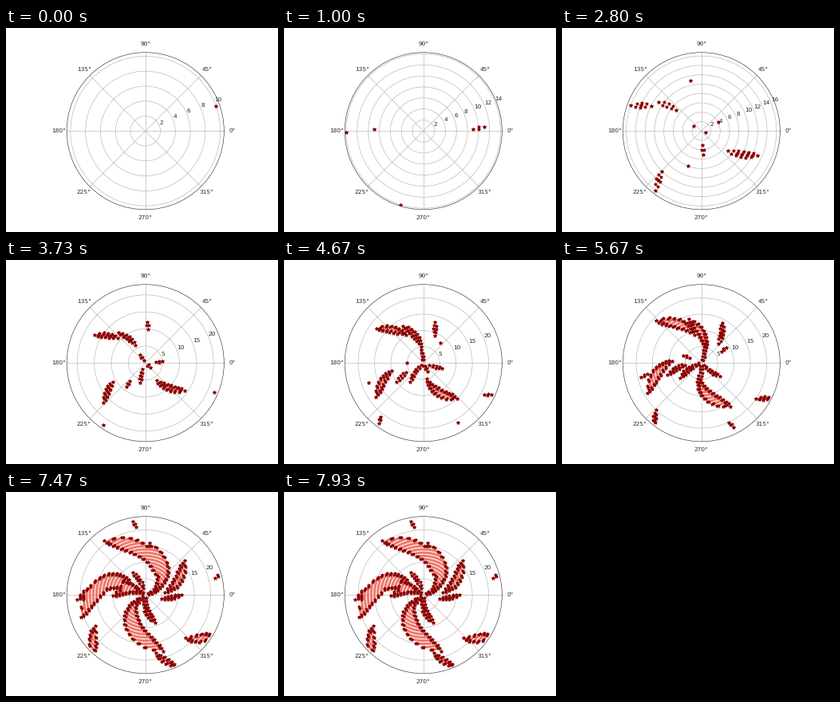
A matplotlib script that plays this animation: 341x256 px, repeating every 8 s.

```python
import matplotlib.pyplot as plt
import numpy as np
from matplotlib.animation import FuncAnimation

DPI = 64
K = 5 / 6                     # point scale of the small stage
STEP_MS = 2800 / 3            # time per galaxy step
STEPS = 9
DT, FRAMES = 40, 200
RINGS = 23
CELL = np.degrees(1)          # arc of one cell, divided by its ring
INK = "#2b2b2b"

plt.rcParams.update({
    "font.family": "DejaVu Sans", "font.size": 10 * K, "text.hinting": "none",
    "axes.linewidth": 0.8 * K, "grid.linewidth": 0.8 * K, "axes.edgecolor": INK,
    "xtick.color": INK, "ytick.color": INK,
    "xtick.major.size": 3.5 * K, "ytick.major.size": 3.5 * K,
    "xtick.major.pad": 10.5 * K - 7,   # polar labels add a fixed 7 pt
    "ytick.major.pad": 3.5 * K,
})

# (ring, degrees) of the sparks that start a cluster, step by step
SPARKS = [
    [(10, 19.6)],
    [(14, 181), (14, -107), (9, 178)],
    [(4, -63)],
    [(11, 102), (8, -111), (2, 148), (4, 28), (1, -16)],
    [(22, -124), (22, -23)],
    [(5, 179), (8, 50), (18, -160), (21, -60)],
    [],
    [(22, 102), (23, 17)],
]


def spin(r):
    """Degrees a ring turns clockwise in one step."""
    return 1.1 * (25 - r)


def grow(ring, angle, age):
    """Angular span of a cluster on each ring it has reached."""
    span = {ring: (angle, angle)}
    for _ in range(age):
        nxt = {}
        for r in range(max(1, min(span) - 1), min(RINGS, max(span) + 1) + 1):
            near = [span[q] for q in (r - 1, r, r + 1) if q in span]
            nxt[r] = (min(a for a, _ in near) - spin(r),
                      max(b for _, b in near) - spin(r))
        span = nxt
    # every ring but the newest is half a cell wider
    return {r: (lo, hi) if abs(r - ring) == age
            else (lo - CELL / 4 / r, hi + CELL / 4 / r)
            for r, (lo, hi) in span.items()}


def merge(spans):
    """Join overlapping spans of one ring."""
    runs = []
    for lo, hi in sorted((lo % 360, lo % 360 + hi - lo) for lo, hi in spans):
        if runs and lo <= runs[-1][1]:
            runs[-1][1] = max(hi, runs[-1][1])
        else:
            runs.append([lo, hi])
    return runs


def to_polar(points):
    pts = np.array(points, float).reshape(-1, 2)
    return np.radians(pts[:, 0]), pts[:, 1]


def galaxy(step):
    """Dark rim stars and the glowing arcs between them, as (theta, r)."""
    rings = {}
    for born, sparks in enumerate(SPARKS[:step + 1]):
        for ring, angle in sparks:
            for r, span in grow(ring, angle, step - born).items():
                rings.setdefault(r, []).append(span)
    stars, arcs = [], []
    for r, spans in rings.items():
        for lo, hi in merge(spans):
            cell = CELL / r
            rim = [lo, hi]
            if hi - lo > 0.85 * cell:
                rim += [lo + cell / 2, hi - cell / 2]
            if hi - lo > cell:
                arcs += [(a, r) for a in np.linspace(lo, hi, 20)]
                arcs.append((np.nan, np.nan))
            stars += [(a, r) for a in rim]
    return to_polar(stars), to_polar(arcs)


def limit(stars):
    """Outer radius: the farthest star plus a 5 % margin."""
    top, low = stars[1].max(), stars[1].min()
    return top + 0.05 * (top - low or top)


states = [galaxy(s) for s in range(STEPS)]
# the second step still shows the stars of the first
states[2] = tuple(tuple(np.concatenate(p) for p in zip(a, b))
                  for a, b in zip(states[1], states[2]))

fig = plt.figure(figsize=(341 / DPI, 256 / DPI), dpi=DPI)
ax = fig.add_subplot(projection="polar")
glow, = ax.plot([], [], color="#ee7a6e", lw=3.4, solid_capstyle="butt", zorder=2)
dots, = ax.plot([], [], "*", color="darkred", ms=6 * K, mew=K, zorder=2.1)


def update(i):
    stars, arcs = states[int((i * DT + 30) / STEP_MS)]
    dots.set_data(*stars)
    glow.set_data(*arcs)
    rmax = limit(stars)
    gap = 2 if rmax < 20 else 5
    ax.set_rticks(np.arange(gap, rmax, gap))
    ax.set_ylim(0, rmax)
    return glow, dots


anim = FuncAnimation(fig, update, frames=FRAMES, interval=DT,
                     init_func=lambda: update(0), repeat=True, repeat_delay=0)
plt.show()
```
